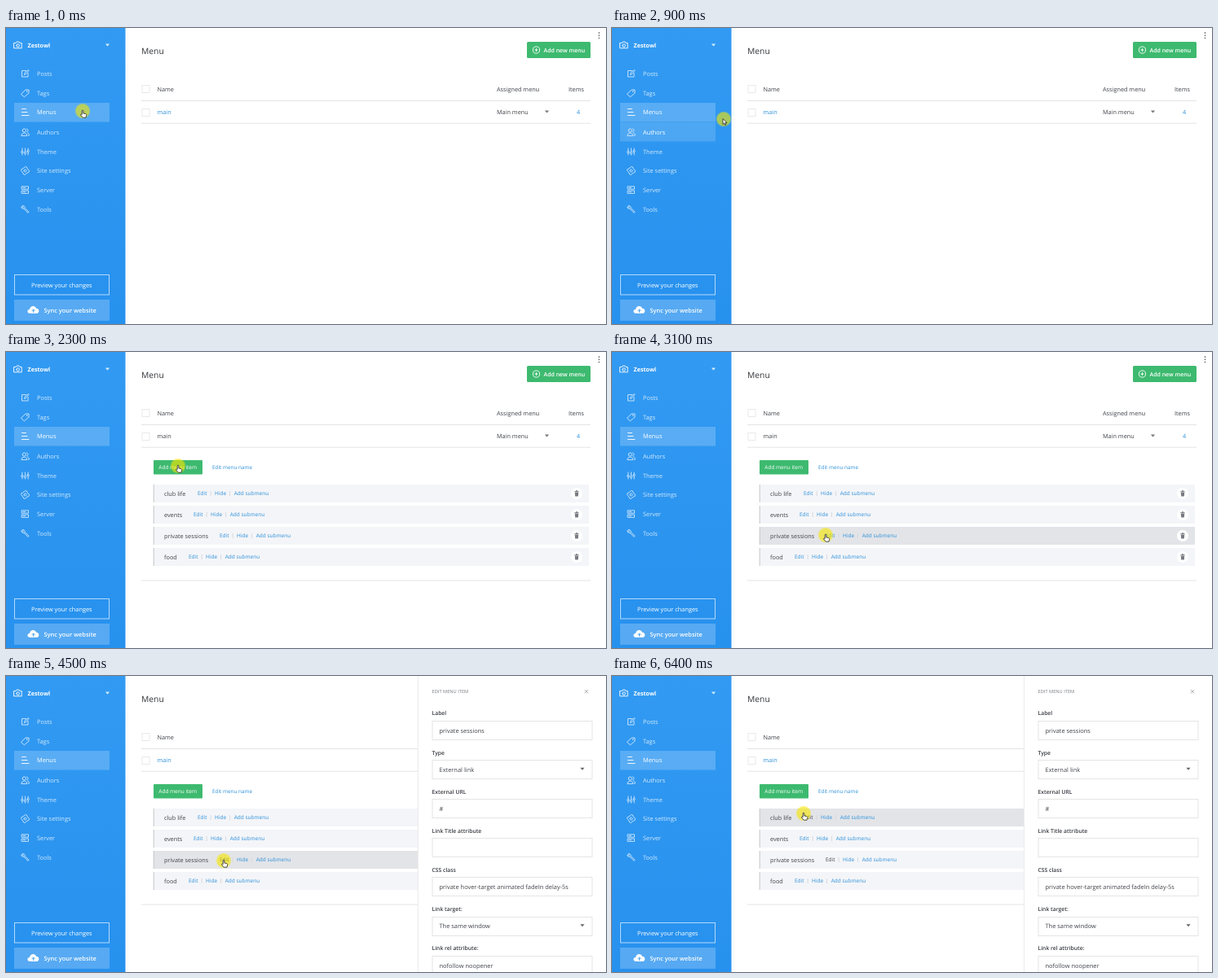
An HTML page that plays this animation: 736x364 px, repeating every 6.9 s.

```html
<!DOCTYPE html>
<html lang="en">
<head>
<meta charset="utf-8">
<title>Menu editor</title>
<style>
  html, body { margin: 0; width: 100%; height: 100%; overflow: hidden; background: #fff; }
  svg { display: block; width: 100%; height: 100%; }
  text { font-family: "Open Sans", "Noto Sans", sans-serif; text-rendering: geometricPrecision; white-space: pre; }
  .icon { fill: none; stroke: #d3e9fc; stroke-width: .9; stroke-linecap: round; stroke-linejoin: round; }
</style>
</head>
<body>
<svg id="stage" viewBox="0 0 736 364"></svg>
<script>
const LOOP = 6900, STEP = 100;
const BLUE = '#2b90da', INK = '#41444a', GREEN = '#3dba6f', LINE = '#e4e4e4', PALE = '#d3e9fc';
const OPEN_AT = 1700, CLICK_AT = 3800, PANEL_WIDTH = 231;

const text = (x, y, str, { size = 7.4, fill = INK, weight = 400, id = '' } = {}) =>
  `<text ${id && `id="${id}"`} x="${x}" y="${y + size * .36}" font-size="${size}" font-weight="${weight}" fill="${fill}">${str}</text>`;
const rect = (x, y, w, h, attrs) => `<rect x="${x}" y="${y}" width="${w}" height="${h}" ${attrs}/>`;
const rule = (x1, y1, x2, y2, color = LINE) =>
  `<path d="M${x1} ${y1}L${x2} ${y2}" stroke="${color}" fill="none"/>`;
const caret = (x, y, fill) => `<path d="M${x - 2.6} ${y - 1.3}h5.2l-2.6 3z" fill="${fill}"/>`;
const icon = (x, y, d, attrs = '') => `<path class="icon" transform="translate(${x} ${y})" d="${d}" ${attrs}/>`;
const ring = (x, y, r) => `M${x - r} ${y}a${r} ${r} 0 1 0 ${2 * r} 0a${r} ${r} 0 1 0 ${-2 * r} 0`;

const gear = Array.from({ length: 16 }, (_, i) => {
  const a = i * Math.PI / 8, r = i % 4 < 2 ? 4.9 : 3.8;
  return (i ? 'L' : 'M') + (r * Math.cos(a)).toFixed(2) + ' ' + (r * Math.sin(a)).toFixed(2);
}).join('') + 'Z' + ring(0, 0, 1.5);

const navItems = [
  ['Posts', 56, 'M1-3.5H-4V4H3.5V-.5M-1 1L0-1.5L4-4.5L4.5-3.5L1 .5Z'],
  ['Tags', 80, 'M-4.8 1L.5-4H4.5V0L-.8 4.6Z' + ring(2.4, -2, .4)],
  ['Menus', 103.5, 'M-4-4H1M-4 0H2.5M-4 4H4.5'],
  ['Authors', 128, ring(-1.2, -2, 2.1) + 'M-4.6 4.2C-4.6 0 2.2 0 2.2 4.2ZM2-4C4.2-3.4 4-.8 2-.2M3 .8C4.4 1.4 4.8 2.6 4.8 4.2H3.6'],
  ['Theme', 152, 'M-3.6-4V-1M-3.6 2V4M0-4V0M0 3V4M3.6-4V-2M3.6 1V4' + ring(-3.6, .5, 1.2) + ring(0, 1.5, 1.2) + ring(3.6, -.5, 1.2)],
  ['Site settings', 175.5, gear],
  ['Server', 199, 'M-4-4.2H4V-.8H-4ZM-4 1H4V4.4H-4ZM-2.5-2.5H0M-2.5 2.7H0'],
  ['Tools', 223, 'M-1.2-.6L3.4 4.4L4.6 3.2L-.2-1.5C0-3.2-1.6-5-3.6-4.4L-2-2.8L-3-1.8L-4.6-3.4C-5-1.5-3-.2-1.2-.6Z'],
];

const sidebar = () => rect(0, 0, 146.5, 364, 'fill="url(#sky)"')
  + icon(14.6, 21, 'M-4.6-2.6H-2.4L-1.5-4H1.5L2.4-2.6H4.6V3.8H-4.6Z' + ring(0, .5, 1.8), 'style="stroke:#fff"')
  + text(26.5, 21, 'Zestowl', { size: 7.2, fill: '#fff', weight: 700 })
  + caret(124.5, 20.7, '#d8ecfd')
  + rect(10, 92, 117, 23.5, 'fill="#fff" fill-opacity=".2"')
  + rect(10, 116, 117, 23.5, 'id="authorsHover" fill="#fff" fill-opacity=".15"')
  + navItems.map(([label, y, d]) => icon(23.5, y, d, label === 'Menus' ? 'style="stroke:#fff"' : '')
      + text(38, y, label, { fill: label === 'Menus' ? '#fff' : PALE, id: 'nav' + label.split(' ')[0] })).join('')
  + rect(10.5, 303.5, 116, 24.5, 'fill="none" stroke="#fff" stroke-opacity=".65"')
  + text(31, 316, 'Preview your changes', { fill: '#fff' })
  + rect(10, 334, 117, 26, 'fill="#fff" fill-opacity=".22"')
  + '<path d="M29.5 351C25.4 351 25.6 346 29 346C29.6 341 36 340.6 37 344.8C41.4 344.8 41.4 351 37.6 351Z" fill="#fff"/>'
  + '<path d="M33.6 350V346.3M31.8 347.8L33.6 346L35.4 347.8" stroke="#3b9bee" fill="none"/>'
  + text(46.5, 347, 'Sync your website', { fill: '#fff', weight: 600 });

// label, x of its "Edit" link
const rows = [['club life', 235], ['events', 230], ['private sessions', 262], ['food', 224]];
const rowY = i => 174 + 26 * i;
const link = { size: 6.5, fill: BLUE };

const menuRow = ([label, x], i) => {
  const y = rowY(i);
  return rect(181, y - 11, 534, 22, `id="row${i}"`)
    + rule(181.2, y - 11, 181.2, y + 11, '#c4c5c9')
    + text(194, y, label, { size: 7.3 })
    + text(x, y, 'Edit', { ...link, id: 'edit' + i })
    + text(x + 21, y, 'Hide', link) + text(x + 44.7, y, 'Add submenu', link)
    + rule(x + 16.2, y - 3, x + 16.2, y + 3, '#d8d9dd') + rule(x + 39.6, y - 3, x + 39.6, y + 3, '#d8d9dd')
    + `<g class="docked"><circle cx="700" cy="${y}" r="7" fill="#fff"/>`
    + `<path d="M697.3 ${y - 2.8}h1.7v-.9h2v.9h1.7v1h-5.4zM697.8 ${y - 1.3}h4.4l-.4 4.8h-3.6z" fill="#777a80"/></g>`;
};

const page = () => rule(149.5, 0, 149.5, 364, '#f6f6f6')
  + text(166, 28, 'Menu', { size: 10.3, weight: 500, fill: '#33363b' })
  + [75, 104].map(y => rect(167, y - 4.5, 9, 9, `fill="#fff" stroke="#e9e9e9"`)).join('')
  + text(185.5, 75, 'Name', { size: 7.3 })
  + text(185.5, 103.5, 'main', { size: 7.3, id: 'main' })
  + [89.5, 117.2].map(y => rule(166, y, 717, y)).join('')
  + '<g class="docked">'
  + rect(639, 17, 78, 20, `rx="1.5" fill="${GREEN}"`)
  + `<path d="${ring(650.5, 27, 4.1)}M648.5 27H652.5M650.5 25V29" fill="none" stroke="#fff" stroke-width=".9"/>`
  + text(659.5, 27, 'Add new menu', { size: 7, fill: '#fff', weight: 600 })
  + text(602, 75, 'Assigned menu', { size: 7.3 }) + text(690, 75, 'Items', { size: 7.3 })
  + text(602, 103.5, 'Main menu', { size: 7.3 }) + caret(663.5, 102.7, '#777')
  + text(700, 103.5, '4', { size: 7.3, fill: BLUE }) + '</g>'
  + '<g id="submenu">'
  + rect(181, 133, 60, 17.5, `rx="1" fill="${GREEN}"`)
  + text(187.3, 142, 'Add menu item', { size: 6.5, fill: '#fff', weight: 500 })
  + text(253, 142, 'Edit menu name', { ...link, size: 6.4 })
  + rows.map(menuRow).join('') + rule(166, 281, 717, 281) + '</g>'
  + [6, 9.2, 12.4].map(y => `<circle cx="727.5" cy="${y}" r=".9" fill="#777"/>`).join('');

const fields = [
  ['Label', 'private sessions'], ['Type', 'External link', true], ['External URL', '#'],
  ['Link Title attribute', ''], ['CSS class', 'private hover-target animated fadeIn delay-5s'],
  ['Link target:', 'The same window', true], ['Link rel attribute:', 'nofollow noopener'],
];

const panel = () => '<g id="panel">' + rect(505, 0, 232, 364, 'fill="#fff"')
  + rule(505.5, 0, 505.5, 364, '#ebebeb')
  + text(522.5, 18.5, 'EDIT MENU ITEM', { size: 5.7, fill: '#777a80' })
  + '<path d="M709.8 17l4.4 4.4M714.2 17l-4.4 4.4" stroke="#999" stroke-width=".8"/>'
  + fields.map(([label, value, select], i) => {
      const y = 46 + 48.1 * i;
      return text(522.5, y, label, { size: 6.8, weight: 600, fill: '#383b40' })
        + rect(523, Math.round(y + 9) + .5, 196, 23, `fill="#fff" stroke="${LINE}"`)
        + text(531.5, y + 21.3, value, { size: 7.45, weight: select ? 500 : 400 })
        + (select ? caret(707, y + 20, '#666') : '');
    }).join('') + '</g>';

const pointer = '<g id="pointer"><circle r="9.6" fill="url(#glow)"/>'
  + '<path id="hand" d="M-.8 0C-.8-1.2.9-1.2.9 0V3L3.6 3.5C4.7 3.8 4.8 4.4 4.6 5.4L4 8.2H.2L-2.4 5C-2.6 4-1.6 3.6-.8 4.6Z" fill="#fff" stroke="#222" stroke-width=".8"/>'
  + '<path id="arrow" d="M-1-.5V6.4L.6 5L1.8 7.6L2.9 7L1.8 4.6H4Z" fill="#fff" stroke="#222" stroke-width=".8"/></g>';

document.getElementById('stage').innerHTML = `<defs>
  <linearGradient id="sky" x2="0" y2="1"><stop stop-color="#329af2"/><stop offset="1" stop-color="#2791ee"/></linearGradient>
  <radialGradient id="glow"><stop offset=".8" stop-color="#f5e600" stop-opacity=".62"/><stop offset="1" stop-color="#f5e600" stop-opacity=".1"/></radialGradient>
  </defs>` + rect(0, 0, 736, 364, 'fill="#fff"') + page() + sidebar() + panel() + pointer;

const $ = id => document.getElementById(id);
const show = (id, on) => $(id).setAttribute('visibility', on ? 'visible' : 'hidden');
const tint = (id, color) => $(id).setAttribute('fill', color);
const docked = document.querySelectorAll('.docked');

// time, x, y of the pointer tip
const path = [
  [0, 94, 102], [600, 94, 102], [800, 116, 120], [900, 137, 112], [1300, 191, 102], [1700, 191, 102],
  [2200, 211, 140], [2400, 211, 140], [3100, 262, 225], [3500, 267, 227], [5900, 267, 227], [6200, 235, 169],
];
const arrowTimes = [[900, 1200], [1900, 2000], [2500, 3000], [6000, 6100]];
const within = (t, [from, to]) => t >= from && t <= to;

function pointerAt(t) {
  const next = path.findIndex(p => p[0] > t);
  if (next < 0) return path[path.length - 1].slice(1);
  const [t0, x0, y0] = path[next - 1], [t1, x1, y1] = path[next];
  const k = (t - t0) / (t1 - t0), ease = k * k * (3 - 2 * k);
  return [x0 + (x1 - x0) * ease, y0 + (y1 - y0) * ease];
}

function draw(t) {
  const [x, y] = pointerAt(t);
  const isOpen = t >= OPEN_AT, isArrow = arrowTimes.some(span => within(t, span));
  $('pointer').setAttribute('transform', `translate(${x} ${y})`);
  show('hand', !isArrow);
  show('arrow', isArrow);

  const overAuthors = within(t, [800, 900]);
  show('authorsHover', overAuthors);
  tint('navAuthors', overAuthors ? '#fff' : PALE);

  show('submenu', isOpen);
  tint('main', within(t, [1300, 3600]) ? INK : BLUE);
  const shift = t >= CLICK_AT ? 2 : 0;
  docked.forEach(g => g.setAttribute('transform', `translate(${shift} 0)`));
  rows.forEach((_, i) => {
    tint('row' + i, Math.abs(y - rowY(i)) < 11 ? '#e3e4e8' : '#f4f5f8');
    $('row' + i).setAttribute('width', 534 + shift);
  });
  tint('edit0', t >= 6200 ? INK : BLUE);
  tint('edit2', t >= 3200 ? INK : BLUE);

  const left = 1 - Math.min(1, Math.max(0, (t - CLICK_AT) / 400));
  $('panel').setAttribute('transform', `translate(${PANEL_WIDTH * left * left} 0)`);
  show('panel', left < 1);
}

const start = performance.now();
function tick() {
  const t = (performance.now() - start) % LOOP;
  draw(Math.floor(t / STEP) * STEP);
  requestAnimationFrame(tick);
}
tick();
</script>
</body>
</html>
```
